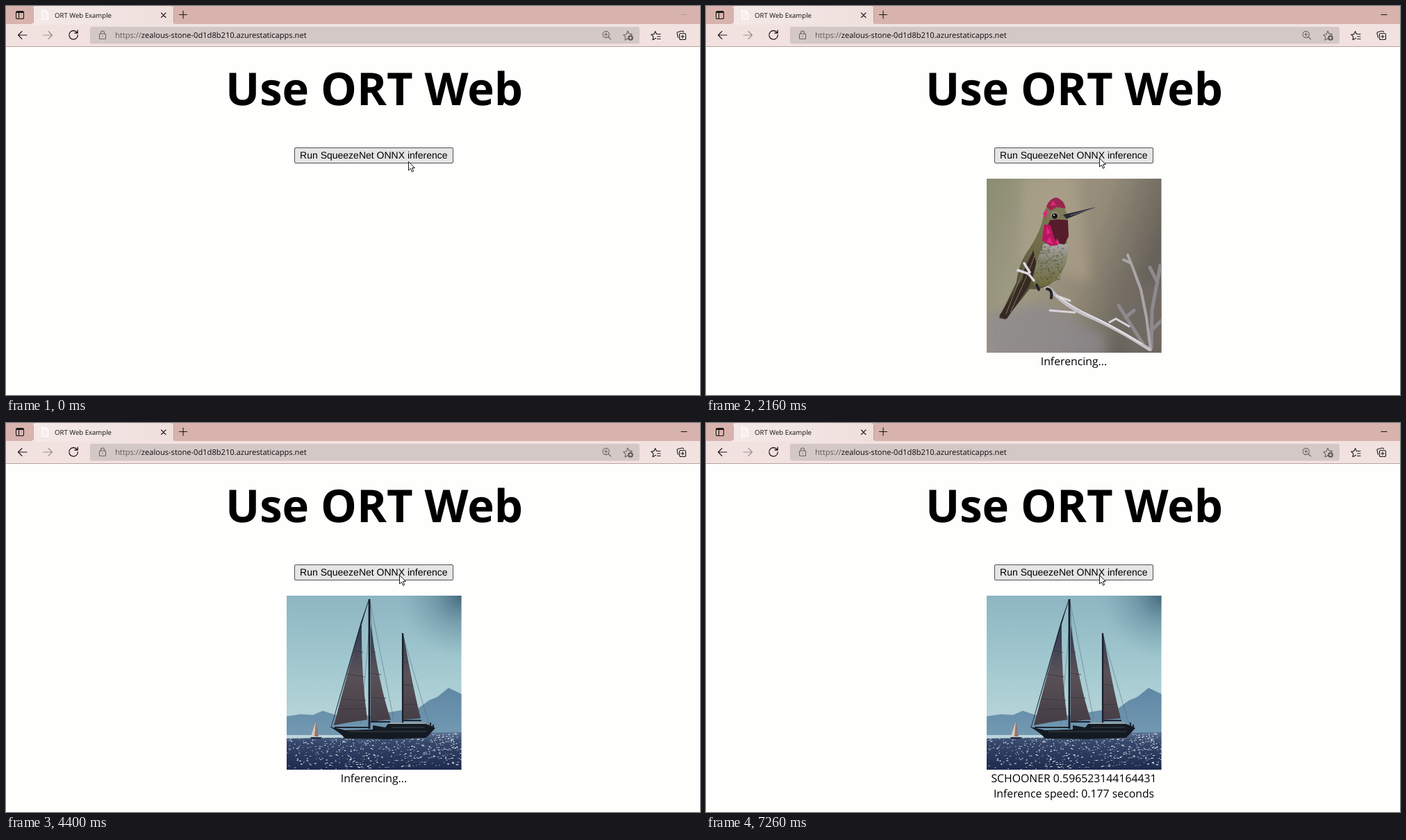
Recreate the animation shown at these times as an HTML page. Size 999 by 561 pixels, loop 8 s.

```html
<!DOCTYPE html>
<html lang="en">
<head>
<meta charset="utf-8">
<title>ORT Web Example</title>
<style>
html, body { margin: 0; width: 100%; height: 100%; overflow: hidden; background: #fefefd; }
svg { display: block; }
text { font-family: "Open Sans", "Noto Sans", sans-serif; text-rendering: geometricPrecision; }
.mid { text-anchor: middle; }
.icon { fill: none; stroke: #1d1a1a; stroke-width: 1.1; stroke-linecap: round; stroke-linejoin: round; }
.soft { stroke: #6d6463; }
.result { font-size: 15.8px; fill: #000; }
.photo { visibility: hidden; }
</style>
</head>
<body>
<svg width="999" height="561" viewBox="0 0 999 561">
  <defs>
    <linearGradient id="tab" x2="1"><stop stop-color="#f4e9e7"/><stop offset="1" stop-color="#efdfdc"/></linearGradient>
    <linearGradient id="ground" x2="0" y2="1">
      <stop stop-color="#f6faea"/><stop offset=".4" stop-color="#f6f3e2"/>
      <stop offset=".6" stop-color="#efe4d0"/><stop offset="1" stop-color="#f2f3d8"/>
    </linearGradient>
    <linearGradient id="fur" x2="1"><stop stop-color="#ecdca4"/><stop offset=".5" stop-color="#efd792"/><stop offset="1" stop-color="#c79c4c"/></linearGradient>
    <linearGradient id="face" x2=".3" y2="1"><stop stop-color="#c39a55"/><stop offset=".5" stop-color="#d8b069"/><stop offset="1" stop-color="#e8d3a8"/></linearGradient>
    <linearGradient id="blurry" x2="1" y2=".35">
      <stop stop-color="#8a8d72"/><stop offset=".35" stop-color="#a09a84"/>
      <stop offset=".65" stop-color="#938a78"/><stop offset="1" stop-color="#67625a"/>
    </linearGradient>
    <linearGradient id="plumage" x1=".8" x2=".2" y2="1"><stop stop-color="#807b58"/><stop offset=".5" stop-color="#6b6846"/><stop offset="1" stop-color="#3c3528"/></linearGradient>
    <linearGradient id="belly" x2="0" y2="1"><stop stop-color="#a9a7a3"/><stop offset=".4" stop-color="#86856f"/><stop offset="1" stop-color="#6f6a3e"/></linearGradient>
    <linearGradient id="sky" x2="0" y2="1"><stop stop-color="#8db6c2"/><stop offset=".45" stop-color="#a5cbd1"/><stop offset=".8" stop-color="#bcd6da"/></linearGradient>
    <radialGradient id="corner" cx="1" cy="0" r=".36"><stop stop-color="#46697d"/><stop offset=".4" stop-color="#587f92" stop-opacity=".55"/><stop offset="1" stop-color="#6f9cab" stop-opacity="0"/></radialGradient>
    <linearGradient id="hills" x2="0" y2="1"><stop stop-color="#5f88a5"/><stop offset="1" stop-color="#7399b2"/></linearGradient>
    <linearGradient id="sea" x2="0" y2="1"><stop stop-color="#5d7392"/><stop offset=".25" stop-color="#36486c"/><stop offset="1" stop-color="#1d2a4c"/></linearGradient>
    <linearGradient id="sail" x2="0" y2="1"><stop stop-color="#2c3750"/><stop offset=".5" stop-color="#5a5158"/><stop offset="1" stop-color="#443c45"/></linearGradient>
    <filter id="haze" x="-50%" y="-50%" width="200%" height="200%"><feGaussianBlur stdDeviation="8"/></filter>
    <filter id="fuzz"><feGaussianBlur stdDeviation=".6"/></filter>
    <filter id="shade" x="-50%" y="-50%" width="200%" height="200%"><feGaussianBlur stdDeviation="3"/></filter>
    <clipPath id="frame"><rect width="251.5" height="251"/></clipPath>
    <clipPath id="coat"><path id="coatShape" d="M86 132Q77 160 76 200L77 251H173Q177 190 170 145Q165 105 151 60L140 110Z"/></clipPath>
    <clipPath id="head"><path id="headShape" d="M80 50Q88 27 114 25Q141 25 151 48Q156 75 149 97Q141 123 123 132Q107 141 96 131Q83 112 79 84Z"/></clipPath>
  </defs>

  <!-- browser frame -->
  <path fill="#d8b3ad" d="M0 0H999V27H0Z"/>
  <path fill="#f1e2e0" d="M0 26H999V58H0Z"/>
  <path fill="url(#tab)" d="M35 27Q39 26 39 22V3Q39 0 43 0H237Q241 0 241 3V22Q241 26 245 27Z"/>
  <path stroke="#b28f8a" stroke-opacity=".65" fill="none" d="M39.5 25V3M241.5 25V3"/>
  <path stroke="#b9a3a0" d="M0 58.5H999"/>
  <rect x="121" y="30" width="791" height="24.5" rx="3" fill="#d4c8c7"/>
  <g class="icon">
    <rect x="14.5" y="7.5" width="11" height="11" rx="2"/><path stroke-width="2.2" d="M15 9H25"/><path d="M18.5 9V18"/>
    <path stroke="#fff" fill="#f7efed" d="M51.5 6.5H57L60.5 10V19.5H51.5ZM57 6.5V10H60.5"/>
    <path d="M223.5 10L230 16.5M230 10L223.5 16.5M249.5 12.5H260.5M255 7V18"/>
    <path d="M17.5 42H30M23 36.5L17.5 42L23 47.5"/>
    <path stroke="#9c8f8d" d="M54 42H66.5M61 36.5L66.5 42L61 47.5"/>
    <path stroke-width="1.3" d="M102.4 38.4A6.3 6.3 0 1 0 103.4 42M103.2 35V39H99"/>
    <g class="soft"><rect x="134.5" y="40" width="9" height="7.5" rx="1"/><path d="M136.5 40V38.5A2.5 2.5 0 0 1 141.5 38.5V40M139 43.5V44"/>
      <circle cx="863.7" cy="41" r="4.6"/><path d="M867 44.5L870.5 48M861.5 41H866M863.7 38.8V43.2"/>
      <path d="M895 36L896.9 39.9L901.3 40.6L898 43.7L897 48L895 47.1L891.1 49.1L891.8 44.8L888.7 41.7L893 41Z"/>
    </g>
    <circle cx="899" cy="46" r="3.8" fill="#564e4d" stroke="none"/><path stroke="#fff" stroke-width=".9" d="M897 46H901M899 44V48"/>
    <path d="M935.5 46.5L931 48.8L931.8 44.2L928.6 41.2L932.8 40.6L934.6 36.6L936.4 40.5H942M937.5 44H942M937.5 47.5H942"/>
    <path d="M967.5 45.5L966 39.3Q965.8 37.8 967.2 37.5L973.5 36Q975 35.8 975.4 37.5"/><rect x="969.5" y="39.5" width="9" height="9" rx="2"/><path d="M971.8 44H976.2M974 41.8V46.2"/>
    <path id="minimise" stroke-linecap="butt" d="M971.5 12.5H980.5"/>
  </g>
  <text x="70" y="16.5" font-size="9.6" fill="#111">ORT Web Example</text>
  <text x="157" y="46" font-size="11.1" fill="#0c0a0a"><tspan fill="#625958">https://</tspan>zealous-stone-0d1d8b210.azurestaticapps.net</text>

  <!-- page -->
  <text class="mid" x="530" y="143" font-size="65.2" font-weight="700">Use ORT Web</text>
  <rect id="button" x="415.5" y="204.5" width="228" height="22" rx="1.5"/>
  <text class="mid" x="529.3" y="220.3" style="font: 14px 'Liberation Sans', Arial, sans-serif">Run SqueezeNet ONNX inference</text>

  <g transform="translate(404 249)" clip-path="url(#frame)">
    <g class="photo" id="cheetah">
      <path fill="url(#ground)" d="M0 0H252V251H0Z"/>
      <g filter="url(#haze)">
        <path fill="#fffffa" d="M0 20H75V100H0ZM95 0H165V60H95Z"/>
        <path fill="#ddd8d0" d="M172 0H205L225 70H192Z"/><path fill="#cdd6b4" d="M212 0H252V50H222Z"/>
        <path fill="#bfe892" d="M164 100L185 75L205 55L252 70V118L190 130Z"/>
        <path fill="#e3f3c4" d="M0 0H70L50 20H0ZM0 65H65V82H0Z"/>
        <path fill="#ecdfca" d="M0 130H75V155H0ZM178 145H252V170H178Z"/>
        <path fill="#f9f7ea" d="M180 205H252V251H180Z"/>
        <path fill="#a5da6c" d="M0 200L35 190L74 200V214H0ZM218 188L252 182V202H228Z"/>
        <path fill="#dff0b4" d="M0 222H70V251H0Z"/>
      </g>
      <g filter="url(#fuzz)">
        <use href="#coatShape" fill="url(#fur)"/>
        <path fill="#f6f0e2" filter="url(#shade)" d="M88 128Q84 155 100 163Q125 170 138 148L146 118Z"/>
        <g clip-path="url(#coat)"><path fill="#8d6427" opacity=".5" filter="url(#shade)" d="M152 62L147 108L165 150L170 251H185L180 130Z"/></g>
        <g id="spots" clip-path="url(#coat)" fill="#382a1a"/>
        <path fill="#86683f" d="M79 46Q74 22 88 21Q98 25 96 36ZM136 32Q142 19 153 20Q160 26 157 42L150 52Z"/>
        <path fill="#33281c" d="M81 39Q80 27 88 25L94 35ZM142 32Q148 24 153 28L152 43Z"/>
        <use href="#headShape" fill="url(#face)"/>
        <g clip-path="url(#head)" filter="url(#shade)">
          <path fill="#93682f" opacity=".65" d="M145 40L136 75L130 105L124 132L160 120V40ZM96 70L100 50L112 68L116 98H98Z"/>
          <path fill="#f1dfb5" d="M82 83L92 86L94 108L86 100ZM122 84L136 82L132 102L124 104ZM84 62L95 65L88 71ZM118 64L134 62L130 69Z"/>
          <path fill="#f3e7cf" d="M93 112Q105 120 122 110L128 122Q118 137 104 137Q93 130 93 112Z"/>
        </g>
        <g id="freckles" fill="#553d1c"/>
        <g fill="none" stroke="#251b12" stroke-linecap="round"><path stroke-width="2.4" d="M92 81Q97 92 94 108M117 80Q113 94 122 108Q126 114 124 120"/><path stroke-width="1.4" d="M105 120V126Q101 130 97 127M105 126Q112 132 120 127"/></g>
        <path fill="#1f1711" d="M96 111Q105 107 114 111Q113 121 105 124Q97 121 96 111ZM81 74Q88 67 95 77Q89 83 82 79ZM117 78Q122 67 134 72Q131 82 120 81Z"/>
        <circle cx="88" cy="75.5" r="3.2" fill="#a6651c"/><circle cx="126" cy="75" r="3.5" fill="#a6651c"/>
        <circle cx="88" cy="75.5" r="1.7"/><circle cx="126" cy="75" r="1.8"/>
      </g>
    </g>

    <g class="photo" id="hummingbird">
      <path fill="url(#blurry)" d="M0 0H252V251H0Z"/>
      <g filter="url(#haze)"><path fill="#8e8a91" opacity=".75" d="M0 195L80 180L170 225V260H0Z"/><path fill="#776f68" opacity=".6" d="M190 150H260V251H200Z"/><path fill="#b1a58c" opacity=".55" d="M50 0H130L150 150L50 120Z"/></g>
      <g fill="none" stroke-linecap="round" stroke-linejoin="round" filter="url(#fuzz)">
        <path stroke="#8d898d" stroke-width="5" d="M190 183L225 238M200 200L212 190M250 125L238 190L237 245M251 205L236 220M235 128L246 150"/>
        <path stroke="#aaa5a8" stroke-width="4" d="M203 110L211 130L222 160L230 200L236 247M197 117L208 122"/>
        <path stroke="#c4c0c6" stroke-width="5" d="M52 126Q69 149 92 160Q112 184 148 199T234 246"/>
        <path stroke="#d8d5da" stroke-width="3" d="M45 133L63 137L56 122M91 190L127 193M101 169L120 176M177 207L186 202L205 213"/>
        <path stroke="#ecebef" stroke-width="1.4" d="M105 171Q125 186 151 198T223 238"/>
      </g>
      <g filter="url(#fuzz)">
        <path fill="url(#plumage)" d="M96 29Q86 34 82 53Q78 76 62 100Q46 121 43 149L18 201L27 203L62 159Q83 162 99 146Q117 127 117 102Q113 84 117 61Q116 37 96 29Z"/>
        <path fill="#352a22" d="M67 103Q53 124 52 144L18 198L29 202L61 155L72 124Z"/>
        <path stroke="#897369" fill="none" d="M66 105Q52 131 28 195M69 111Q61 135 34 193"/>
        <path fill="url(#belly)" d="M82 94L117 94Q118 119 106 138Q91 159 68 154Q66 132 75 112Z"/>
        <g id="feathers" fill="#3f4130" opacity=".55"/>
        <path fill="#9c2450" d="M86 40Q90 29 100 27Q111 30 114 43L101 41L92 46Z"/>
        <path fill="#551c2a" d="M91 60Q101 58 117 60L118 83L112 95L93 92L83 81Z"/>
        <path fill="#b91560" d="M83 66L92 67L97 85L103 96L92 97L80 89L81 78Z"/>
        <path fill="#db2979" d="M87 69L92 78L86 81ZM91 84L96 95L86 91ZM101 86L105 93L99 94ZM81 50L88 43L85 59ZM95 31L100 38L92 39Z"/>
        <circle cx="98" cy="53" r="5.5" fill="#96917f"/><circle cx="98" cy="54" r="4" fill="#15141a"/><circle cx="97" cy="52.5" r="1" fill="#fff"/>
        <path fill="#272831" d="M110 52Q132 47 157 41Q140 48 115 58Z"/><path stroke="#72737b" d="M120 53L153 43"/>
        <path stroke="#24242c" stroke-width="4" fill="none" stroke-linecap="round" d="M72 153L75 160M87 159Q95 160 93 172"/>
        <path stroke="#dcdae0" stroke-width="3.5" fill="none" stroke-linecap="round" d="M45 132L60 137L68 147M54 122L62 135"/>
      </g>
    </g>

    <g class="photo" id="schooner">
      <path fill="url(#sky)" d="M0 0H252V251H0Z"/><path fill="url(#corner)" d="M0 0H252V251H0Z"/>
      <path fill="url(#hills)" d="M0 174L20 171L38 172L52 166L70 172L95 170L120 173L160 166L190 162L205 151L217 146L233 133L252 142V201H0Z"/>
      <path fill="url(#sea)" d="M0 206Q120 205 190 198L252 197V251H0Z"/>
      <g id="sparkles" fill="#dfe6ee"/>
      <path fill="#92776d" d="M42 179L46 203L36 203Z"/><path fill="#d8cbbb" d="M42 181L40 203H35Z"/><path fill="#28334a" d="M34 204H51L48 207H36Z"/>
      <g filter="url(#fuzz)">
        <path stroke="#4d6374" stroke-width=".5" fill="none" d="M120 8L154 178M167 56L205 186M119 45L107 184M120 10L133 180"/>
        <path stroke="#2c3a4c" d="M118 7L107 39L64 190"/>
        <path fill="url(#sail)" d="M108 39Q88 110 68 187Q92 182 116 179Q107 110 108 39ZM121 41Q133 130 150 179Q135 179 121 183ZM168 55Q181 130 193 177L167 179Z"/>
        <g stroke="#353641" stroke-width=".8" fill="none"><path d="M97 79L110 82M87 113L112 117M78 149L114 151M74 164L115 163M121 80L128 82M121 112L136 114M121 147L143 148M168 95L174 97M168 128L181 130M168 157L187 157"/></g>
        <path stroke="#161c28" stroke-width="2.8" d="M119 5V192"/><path stroke="#161c28" stroke-width="2.2" d="M167 54V188"/>
        <path fill="#141a22" d="M62 189L84 194L124 193V187L142 190L146 185L197 184L209 188L214 191L201 205L146 207L84 206Q78 198 62 189Z"/>
        <path stroke="#b3b4af" stroke-width="1.3" d="M149 184H199"/><path stroke="#4b4f50" stroke-width=".8" d="M89 196H201M151 190H199"/>
        <path stroke="#1c2430" stroke-width="2" d="M69 190H118M167 180H194M121 182H149M207 183V190M211 186V191"/>
      </g>
    </g>
  </g>

  <text id="label" class="mid result" x="529.5" y="518"></text>
  <text id="speed" class="mid result" x="529.5" y="540"></text>
  <path id="cursor" fill="#fff" stroke="#151515" d="M.5 .5V13L3.4 10.4L5.5 15.2L7.6 14.2L5.5 9.6H9.4Z"/>
</svg>

<script>
const LOOP = 8000;
const byId = id => document.getElementById(id);

function randomSource(seed) {
  return () => (seed = (seed * 16807) % 2147483647) / 2147483647;
}

// Fills a group with ellipses; place(random) returns [x, y, rx, ry].
function scatter(id, count, seed, place) {
  const random = randomSource(seed);
  for (let i = 0; i < count; i++) {
    const dot = document.createElementNS("http://www.w3.org/2000/svg", "ellipse");
    const values = place(random, i);
    ["cx", "cy", "rx", "ry"].forEach((name, k) => dot.setAttribute(name, values[k].toFixed(1)));
    byId(id).append(dot);
  }
}

scatter("spots", 140, 731, (r, i) => {
  const row = Math.floor(i / 10), size = 1 + row * .1 + r() * .9;
  return [76 + (i % 10) * 10 + (row % 2) * 5 + r() * 6, 122 + row * 9.6 + r() * 5, size, size * 1.3];
});
scatter("freckles", 70, 417, r => [86 + r() * 61, 31 + r() * 33, .6, .8]);
scatter("feathers", 130, 953, r => {
  const y = 98 + r() * 52;
  return [78 + r() * 36 - (y - 98) * .17, y, 1.1, .8];
});
scatter("sparkles", 620, 1291, r => {
  const depth = r() ** 1.4, x = 252 * r() ** .8;
  return [x, 207 - x * .035 + depth * 46, .4 + r() * (.8 + depth), .25 + r() * .5];
});

const waiting = ["Inferencing...", ""];
const result = (label, seconds) => [label, `Inference speed: ${seconds} seconds`];
const cheetah = result("CHEETAH 0.939099851907071", "0.187");
const hummingbird = result("HUMMINGBIRD 0.890946637313688", "0.181");
const schooner = result("SCHOONER 0.596523144164431", "0.191");
const again = result("SCHOONER 0.596523144164431", "0.177");

// time, photo, text lines, button pressed
const scenes = [
  [0, "", ["", ""], false],
  [530, "cheetah", waiting, false],
  [800, "cheetah", cheetah, false],
  [2030, "cheetah", cheetah, true],
  [2100, "cheetah", waiting, false],
  [2160, "hummingbird", waiting, false],
  [2430, "hummingbird", hummingbird, false],
  [4300, "hummingbird", hummingbird, true],
  [4360, "hummingbird", waiting, false],
  [4400, "schooner", waiting, false],
  [4660, "schooner", schooner, false],
  [6900, "schooner", schooner, true],
  [6960, "schooner", waiting, false],
  [7260, "schooner", again, false]
];
const cursorSteps = [[0, 579, 224], [30, 576, 224], [60, 571, 223], [100, 568, 223], [130, 566, 223], [530, 566, 219]];

const at = (steps, time) => steps.findLast(step => step[0] <= time);
const photos = document.querySelectorAll(".photo");

function draw() {
  const time = performance.now() % LOOP;
  const [, photo, lines, pressed] = at(scenes, time);
  const [, x, y] = at(cursorSteps, time);
  photos.forEach(p => p.style.visibility = p.id === photo ? "visible" : "hidden");
  byId("label").textContent = lines[0];
  byId("speed").textContent = lines[1];
  byId("button").setAttribute("fill", pressed ? "#f5f5f5" : "#e5e5e5");
  byId("button").setAttribute("stroke", pressed ? "#8d8d8d" : "#505050");
  byId("minimise").style.stroke = time < 530 ? "#b59a97" : "#1d1a1a";
  byId("cursor").setAttribute("transform", `translate(${x} ${y})`);
  requestAnimationFrame(draw);
}
draw();
</script>
</body>
</html>
```
